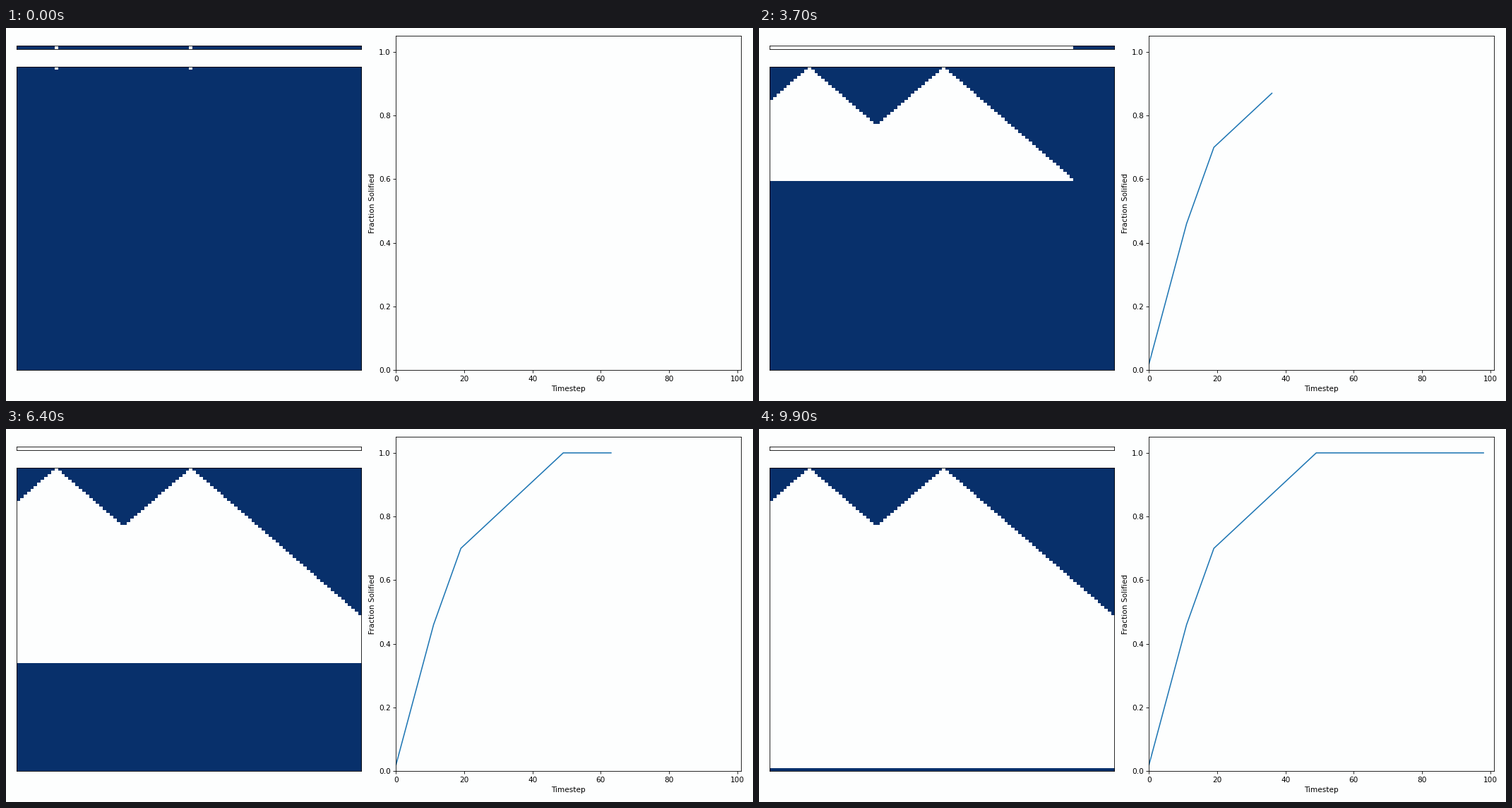
A matplotlib script for the animation above (10 s loop, 1058 by 529 pixels).

```python
import numpy as np
import matplotlib.pyplot as plt
from matplotlib.animation import FuncAnimation
from matplotlib.colors import ListedColormap

W, H = 1058, 529
CELLS, STEPS = 100, 100
SEEDS = (11, 50)
PAPER, LIQUID = "#fdfefe", "#08306b"

plt.rcParams["font.family"] = "DejaVu Sans"
plt.rcParams["font.size"] = 10

# Solid front grows one cell per step in both directions from each seed.
cells = np.arange(CELLS)
reach = np.min([np.abs(cells - s) for s in SEEDS], axis=0)
history = (reach <= np.arange(STEPS + 1)[:, None]).astype(int)
fraction = history.mean(axis=1)

fig = plt.figure(figsize=(14, 7), dpi=W / 14, facecolor=PAPER)


def add_axes(left, top, right, bottom):
    """Axes placed by pixel edges measured from the top left corner."""
    box = [left / W, 1 - bottom / H, (right - left) / W, (bottom - top) / H]
    return fig.add_axes(box, facecolor=PAPER)


def add_grid(ax, rows):
    ax.set_xticks([])
    ax.set_yticks([])
    return ax.imshow(np.zeros((rows, CELLS)), cmap=ListedColormap([LIQUID, PAPER]),
                     vmin=0, vmax=1, aspect="auto", interpolation="nearest")


bar = add_grid(add_axes(15.1, 25.2, 503.3, 30.1), 1)
grid = add_grid(add_axes(15.1, 55.2, 503.3, 485.2), STEPS + 1)

plot = add_axes(552.4, 11.3, 1040.6, 485.2)
plot.set(xlim=(0, 101), ylim=(0, 1.05), xlabel="Timestep", ylabel="Fraction Solified",
         xticks=range(0, 101, 20), yticks=np.arange(6) / 5)
curve, = plot.plot([], [], color="#1f77b4", lw=1.5)


def draw(step):
    shown = history.copy()
    shown[step + 1:] = 0
    grid.set_data(shown)
    bar.set_data(history[step:step + 1])
    curve.set_data(np.arange(step), fraction[:step])
    return bar, grid, curve


anim = FuncAnimation(fig, draw, frames=STEPS, interval=100, init_func=lambda: draw(0),
                     repeat=True, repeat_delay=0)
plt.show()
```
